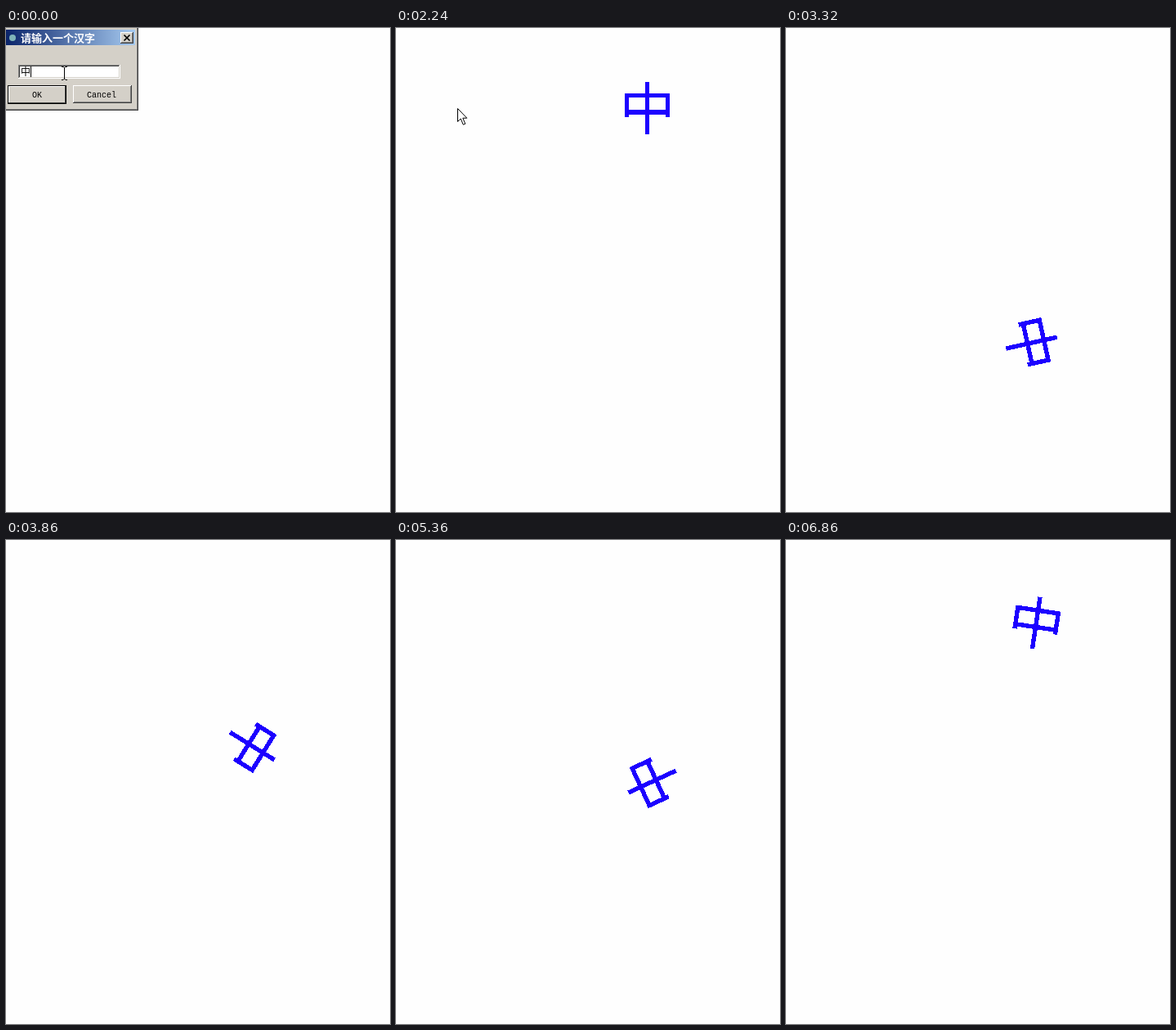
Write an HTML page that moves like this. It is 470x592 px and loops after 6.96 s.

```html
<!DOCTYPE html>
<html lang="zh">
<head>
<meta charset="utf-8">
<title>Bouncing character</title>
<style>
  html, body { margin: 0; width: 100%; height: 100%; overflow: hidden; background: #fefefe; }
  svg { display: block; }
  .cjk { font-family: "Noto Sans CJK SC", "Noto Sans CJK", sans-serif; }
  .label { font: 10px "Liberation Mono", monospace; text-anchor: middle; }
</style>
</head>
<body>
<svg width="470" height="592" viewBox="0 0 470 592">
  <defs>
    <linearGradient id="bar">
      <stop offset="0" stop-color="#0a246a"/>
      <stop offset="1" stop-color="#a6caf0"/>
    </linearGradient>
  </defs>

  <g id="dialog">
    <g id="chrome" shape-rendering="crispEdges">
      <rect width="162" height="101" fill="#404040"/>
      <rect width="161" height="100" fill="#808080"/>
      <rect width="160" height="99" fill="#d4d0c8"/>
      <rect y="2" width="158" height="19" fill="url(#bar)"/>
    </g>
    <circle cx="8" cy="12" r="4" fill="#7fb4b8"/>
    <text class="cjk" x="18" y="17" font-size="13" font-weight="700" fill="#fff">请输入一个汉字</text>
    <path d="M144.5 8.5l7 7m0-7l-7 7" stroke="#000" stroke-width="1.7"/>
    <text class="cjk" x="18" y="58" font-size="12">中</text>
    <path id="caret" d="M30.5 47V60" stroke="#000"/>
    <text class="label" x="38" y="85">OK</text>
    <text class="label" x="117" y="85">Cancel</text>
  </g>

  <path id="glyph" fill="none" stroke="#1c00ff" stroke-width="5.4" shape-rendering="crispEdges"
        d="M0 -25V39M-25 17.5V-8.5H25V17.5M-25 12H25"/>

  <path id="beam" d="M-3 .5H-1L.5 1.5L2 .5H4M.5 1.5V15M-3 16.5H-1L.5 15L2 16.5H4"
        fill="none" stroke="#000"/>
  <path id="arrow" d="M.5 .5V16.5L4.2 13L7.3 20.2L9.8 19.2L6.8 12.2H11.8Z"
        fill="#fff" stroke="#000"/>
</svg>

<script>
const LOOP = 6960, STEP = 60, START = 2240, LAST = 77;
const LEAD = 2.3, PERIOD = 36.48, GRAVITY = 1.187;
const PIVOT_X = 307.3, TOP_Y = 91;

const $ = id => document.getElementById(id);
const show = (el, on) => el.setAttribute("visibility", on ? "visible" : "hidden");

// Bevelled box: outer and inner edge colours, light side first.
function bevel(x, y, w, h, face, [lit, dark, innerLit, innerDark]) {
  const add = (x, y, w, h, fill) => {
    const r = document.createElementNS("http://www.w3.org/2000/svg", "rect");
    Object.entries({ x, y, width: w, height: h, fill }).forEach(([k, v]) => r.setAttribute(k, v));
    $("chrome").append(r);
  };
  add(x, y, w, h, dark);
  add(x, y, w - 1, h - 1, lit);
  add(x + 1, y + 1, w - 2, h - 2, innerDark);
  add(x + 1, y + 1, w - 3, h - 3, innerLit);
  add(x + 2, y + 2, w - 4, h - 4, face);
}
const GREY = "#d4d0c8";
const RAISED = ["#fff", "#404040", GREY, "#808080"];
bevel(140, 5, 16, 14, GREY, RAISED);
bevel(15, 45, 125, 17, "#fff", ["#808080", "#fff", "#404040", GREY]);
bevel(2, 70, 72, 23, GREY, ["#000", "#000", "#fff", "#404040"]);
bevel(82, 70, 72, 22, GREY, RAISED);

// [time, pointer, x, y]
const POINTER = [
  [0, "beam", 71, 47],
  [440, "beam", 70, 54],
  [500, "arrow", 65, 68],
  [560, "arrow", 64, 75],
  [610, "arrow", 63, 79],
  [670, "arrow", 63, 80],
  [940, "arrow", 61, 80],
  [1000, "arrow", 60, 80],
  [2240, "arrow", 75, 98],
  [2300, "arrow", 128, 163],
  [2360, "arrow", 208, 254],
  [2420, "arrow", 270, 387],
  [2480, "arrow", 387, 459],
  [2540, "none", 0, 0]
];

function drawPointer(t) {
  const [, kind, x, y] = POINTER.findLast(p => p[0] <= t);
  for (const id of ["beam", "arrow"]) {
    show($(id), id === kind);
    $(id).setAttribute("transform", `translate(${x} ${y})`);
  }
}

// Half a turn per bounce, free fall from each apex.
function drawGlyph(t) {
  const k = Math.min(LAST, Math.floor((t - START) / STEP));
  const d = Math.max(0, k - LEAD);
  const u = d - Math.round(d / PERIOD) * PERIOD;
  const y = TOP_Y + GRAVITY * u * u;
  const turn = 180 * d / PERIOD;
  $("glyph").setAttribute("transform", `translate(${PIVOT_X} ${y}) rotate(${turn})`);
  show($("glyph"), t >= 1430);
}

const t0 = performance.now();
function draw(now) {
  const t = Math.max(0, now - t0) % LOOP;
  $("dialog").style.display = t < 1250 ? "" : "none";
  show($("caret"), t < 500);
  drawPointer(t);
  drawGlyph(t);
  requestAnimationFrame(draw);
}
draw(t0);
</script>
</body>
</html>
```
